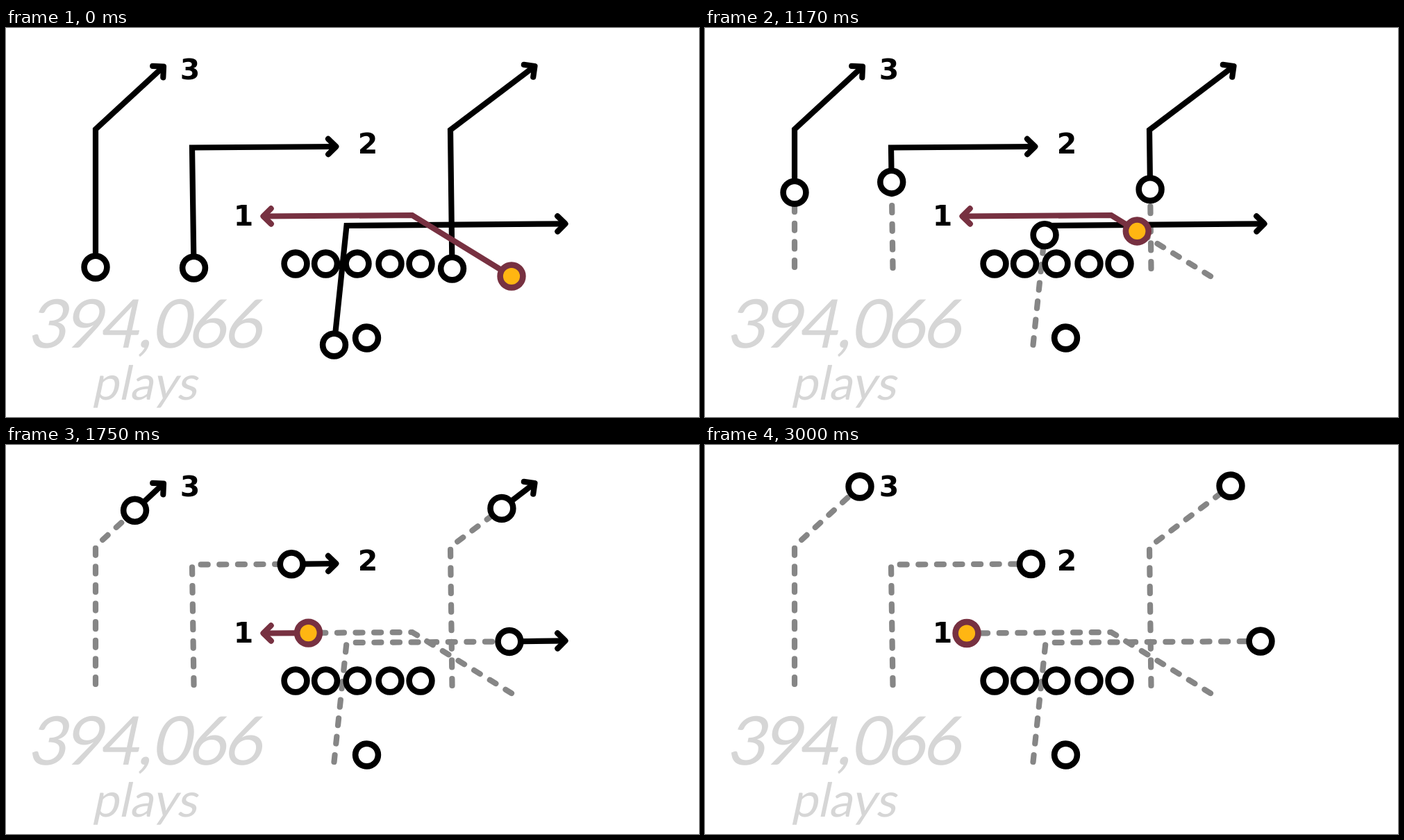
These frames come from a looping animation (998x561 px, 3.08 s). An HTML page:

```html
<!DOCTYPE html>
<html lang="en">
<head>
<meta charset="utf-8">
<title>Route play</title>
<style>
  html, body { margin: 0; width: 100%; height: 100%; overflow: hidden; background: #fff; }
  svg { display: block; width: 100%; height: 100%; }
  path { fill: none; stroke-width: 8.2; }
  circle { fill: #fff; stroke: #000; stroke-width: 8.6; }
  .trail { stroke: #868686; stroke-linecap: round; stroke-dasharray: 10 16.6; }
  .head { stroke-linecap: round; stroke-linejoin: round; }
  .num { font: bold 41px "DejaVu Sans", sans-serif; text-anchor: middle; }
  .count { font-family: Lato, "Open Sans", sans-serif; fill: #d6d6d6; }
</style>
</head>
<body>
<svg id="stage" viewBox="0 0 998 561">
  <g class="count">
    <text transform="translate(30 461) skewX(-12)" font-size="97" letter-spacing="-4.6">394<tspan dx="3">,</tspan><tspan dx="3">066</tspan></text>
    <text transform="translate(123.5 535.5) skewX(-12)" font-size="68">plays</text>
  </g>
  <g id="trails"></g>
  <g id="blockers"></g>
  <g id="runners"></g>
  <g class="num">
    <text x="342" y="285">1</text>
    <text x="521" y="181">2</text>
    <text x="265" y="73.5">3</text>
  </g>
</svg>
<script>
const LOOP = 3080, STEP = 1000 / 12;
const START = 500, DURATION = 2000;
const EASE_IN = 0.42, EASE_OUT = 0.34;
const RADIUS = 16.4;

// start, corner and finish of each runner, plus the arrow tip
const routes = [
  { pts: [[129, 345], [129, 146], [223, 60]], tip: [227, 55.5] },
  { pts: [[270.5, 346], [268, 172.5], [469.5, 171.5]], tip: [475.3, 171] },
  { pts: [[642.5, 347], [640, 147], [757, 59]], tip: [761.5, 55] },
  { pts: [[472.5, 457], [490.5, 285], [800, 283]], tip: [805.5, 282.3] },
  { pts: [[728, 358], [585, 270], [377, 271.5]], tip: [370.5, 271.5], color: "#773141", fill: "#ffb612" }
];
const blockers = [[417, 340], [460.5, 340], [506, 340], [553, 340], [597, 340], [519.5, 447]];

const byId = id => document.getElementById(id);
const toPath = pts => "M" + pts.map(p => p.join(" ")).join("L");
const dist = (a, b) => Math.hypot(b[0] - a[0], b[1] - a[1]);
const mix = (a, b, k) => [a[0] + (b[0] - a[0]) * k, a[1] + (b[1] - a[1]) * k];

function add(parent, tag, attrs) {
  const el = document.createElementNS("http://www.w3.org/2000/svg", tag);
  for (const key in attrs) el.setAttribute(key, attrs[key]);
  return parent.appendChild(el);
}

function arrowHead(from, tip) {
  const back = Math.atan2(from[1] - tip[1], from[0] - tip[0]);
  const arm = turn => [tip[0] + 15.8 * Math.cos(back + turn), tip[1] + 15.8 * Math.sin(back + turn)];
  return toPath([arm(-0.78), tip, arm(0.78)]);
}

for (const [cx, cy] of blockers) add(byId("blockers"), "circle", { cx, cy, r: RADIUS });

for (const r of routes) {
  const [a, b, c] = r.pts;
  const stroke = r.color || "#000";
  r.first = dist(a, b);
  r.second = dist(b, c);
  r.trail = add(byId("trails"), "path", { class: "trail" });
  r.line = add(byId("runners"), "path", { stroke });
  add(byId("runners"), "path", { class: "head", stroke, d: arrowHead(b, r.tip) });
  r.dot = add(byId("runners"), "circle", { r: RADIUS, style: `stroke:${stroke};fill:${r.fill || "#fff"}` });
}

// cubic-bezier(EASE_IN, 0, EASE_OUT, 1)
function ease(x) {
  if (x <= 0) return 0;
  if (x >= 1) return 1;
  let lo = 0, hi = 1;
  for (let i = 0; i < 24; i++) {
    const s = (lo + hi) / 2, u = 1 - s;
    if (3 * s * u * u * EASE_IN + 3 * s * s * u * EASE_OUT + s * s * s < x) lo = s;
    else hi = s;
  }
  return lo * lo * (3 - 2 * lo);
}

function render(ms) {
  const time = Math.floor((ms % LOOP + 4) / STEP) * STEP;
  const p = ease((time - START) / DURATION);
  for (const r of routes) {
    const [a, b, c] = r.pts;
    const run = p * (r.first + r.second);
    const turned = run > r.first;
    const pos = turned ? mix(b, c, (run - r.first) / r.second) : mix(a, b, run / r.first);
    r.trail.setAttribute("d", toPath(turned ? [a, b, pos] : [a, pos]));
    r.line.setAttribute("d", toPath(turned ? [pos, r.tip] : [pos, b, r.tip]));
    r.dot.setAttribute("cx", pos[0]);
    r.dot.setAttribute("cy", pos[1]);
  }
}

const began = performance.now();
function tick() {
  render(performance.now() - began);
  requestAnimationFrame(tick);
}
tick();
</script>
</body>
</html>
```
